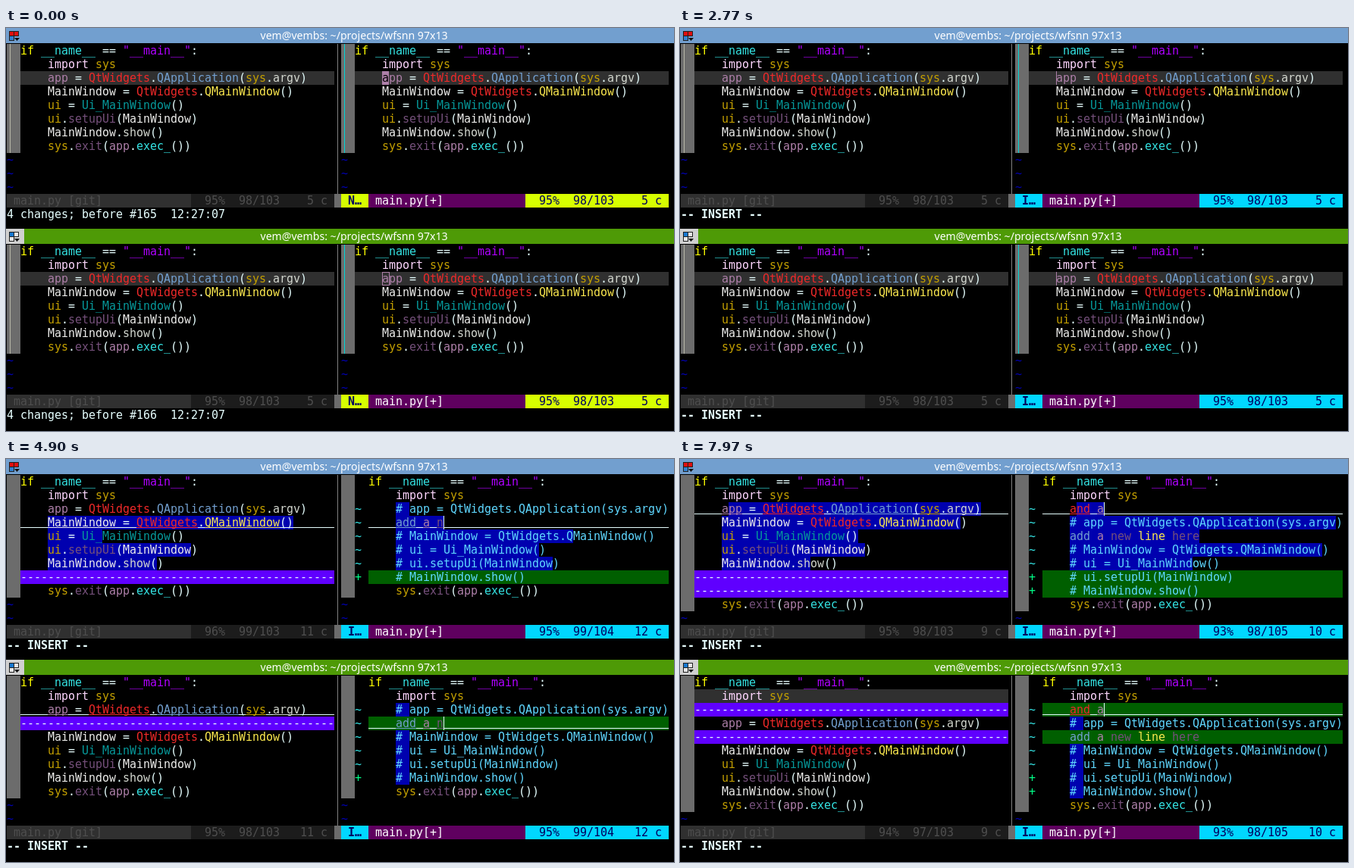
Animation, 881 px wide and 532 px high, one loop 8000 ms. Source, as an HTML page with a canvas:

```html
<!DOCTYPE html>
<html lang="en">
<head>
<meta charset="utf-8">
<title>Two diff views</title>
<style>
html, body { margin: 0; width: 100%; height: 100%; overflow: hidden; background: #000; }
canvas { display: block; }
</style>
</head>
<body>
<canvas id="stage" width="881" height="532"></canvas>
<script>
const ctx = document.getElementById('stage').getContext('2d');
const LOOP = 8000, CW = 9, CH = 18, X0 = 1;
const MONO = '15px "DejaVu Sans Mono", monospace';
const FG = '#e6ffff', GREY = '#6c6c6c', BLUE = '#0000af', GREEN = '#005f00', LINE_BG = '#303030';
const COMMENT = '#5fd7ff', FIRST = 96, TOTAL = 103;

const CODE = [
  'if __name__ == "__main__":',
  '    import sys',
  '    app = QtWidgets.QApplication(sys.argv)',
  '    MainWindow = QtWidgets.QMainWindow()',
  '    ui = Ui_MainWindow()',
  '    ui.setupUi(MainWindow)',
  '    MainWindow.show()',
  '    sys.exit(app.exec_())'
];
const WORDS = {
  if: '#ffff00', import: '#ffd7ff', __name__: '#34e2e2', sys: '#c4a000', app: '#ad7fa8',
  QtWidgets: '#ef2929', QApplication: '#729fcf', MainWindow: '#eeeeec', QMainWindow: '#fce94f',
  ui: '#c4a000', Ui_MainWindow: '#06989a', setupUi: '#75507b', show: '#d3d7cf', argv: '#d3d7cf',
  exit: '#75507b', exec_: '#34e2e2', add: '#729fcf', a: '#ad7fa8', n: '#75507b', new: '#75507b',
  line: '#fce94f', here: '#75507b', and: '#ef2929'
};
const SPARE = ['#729fcf', '#75507b', '#ad7fa8', '#c4a000'];
const MODES = {
  N: { bg: '#d7ff00', fg: '#00005f' },
  V: { bg: '#ffaf00', fg: '#000000' },
  I: { bg: '#00d7ff', fg: '#00005f' }
};

function box(x, y, w, h, color) {
  ctx.fillStyle = color;
  ctx.fillRect(x, y, w, h);
}

// One colour per character.
function colorize(text) {
  if (/^\s*#/.test(text)) return Array(text.length).fill(COMMENT);
  const out = [];
  for (const [part] of text.matchAll(/"[^"]*"|\w+|./g)) {
    let color = FG;
    if (part[0] === '"') color = '#af00ff';
    else if (/\w/.test(part)) color = WORDS[part] || SPARE[(part.charCodeAt(0) + part.length) % 4];
    for (let i = 0; i < part.length; i++) out.push(color);
  }
  return out;
}

// Range between the common start and the common end of two lines.
function changed(a, b) {
  let start = 0, end = 0;
  const n = Math.min(a.length, b.length);
  while (start < n && a[start] === b[start]) start++;
  while (end < n - start && a[a.length - 1 - end] === b[b.length - 1 - end]) end++;
  return [start, a.length - end];
}

const typed = (text, t, start, step) =>
  text.slice(0, Math.max(0, Math.floor((t - start) / step) + 1));

// Editor state at time t.
function editor(t) {
  const s = { mode: 'N', shape: 'block', line: 98, col: 5, lines: [], picked: 0,
    message: '', bold: false, signs: t >= 3300, lag: false };
  const lead = t >= 3250 ? '# ' : typed('# ', t, 2900, 150);
  s.lines = CODE.map((text, i) => {
    const touched = i > 1 && i < 7 && lead && (t >= 3250 || i === 2);
    return { text: touched ? '    ' + lead + text.slice(4) : text, touched, base: i };
  });
  const insert = () => { s.mode = 'I'; s.shape = 'bar'; s.message = '-- INSERT --'; s.bold = true; };
  const older = typed('add a new line here', t, 4150, 120);
  const newer = typed('and a', t, 7450, 120);

  if (t >= 3500) s.lines.splice(3, 0, { text: '    ' + older, fresh: t < 4200 });
  if (t >= 7100) s.lines.splice(2, 0, { text: '    ' + newer, fresh: t < 7400 });

  if (t < 900) s.message = 'undo';
  else if (t < 2350) {
    s.mode = 'V';
    s.picked = 1 + [1200, 1400, 1600, 2100].filter(k => k <= t).length;
    s.line = 97 + s.picked;
    s.message = '-- VISUAL BLOCK --';
    s.bold = true;
  } else if (t < 3250) {
    insert();
    s.col = 5 + lead.length;
  } else if (t >= 3500 && t < 7100) {
    s.line = t < 6800 ? 99 : 98;
    s.col = Math.min(5 + older.length, t < 6500 ? 24 : 23);
    if (t < 6500) insert();
    s.lag = t < 6440;
    if (t >= 6440) { s.shape = 'block'; s.message = ''; }
  } else if (t >= 7100) {
    insert();
    s.col = 5 + newer.length;
    s.lag = true;
  }
  s.leftCol = s.lag ? Math.max(5, s.col - 1) : s.col;
  s.leftLine = s.lag && s.col === 5 ? 98 : s.line;
  return s;
}

// Pairs left and right lines; the plain way puts all gaps after the block.
function align(s, plain) {
  const extra = s.lines.length - CODE.length;
  let block = 0;
  return s.lines.map((right, i) => {
    let left = right.base;
    if (plain && extra && i > 1 && i < s.lines.length - 1) left = block < 5 ? 2 + block++ : undefined;
    return { right, left, text: left === undefined ? null : CODE[left] };
  });
}

function terminal(top, s, focused) {
  const y = row => top + row * CH, x = col => X0 + col * CW;
  const fill = (row, col, n, color) => box(x(col), y(row), n * CW, CH, color);
  function write(row, col, text, color, bold) {
    ctx.font = (bold ? 'bold ' : '') + MONO;
    ctx.textAlign = 'left';
    [...text].forEach((ch, i) => {
      if (ch === ' ') return;
      ctx.fillStyle = Array.isArray(color) ? color[i] : color;
      ctx.fillText(ch, x(col + i), y(row) + 14);
    });
  }
  function codeLine(row, col, width, text, look) {
    const colors = colorize(text);
    if (look.bg) fill(row, col, width, look.bg);
    if (look.range) fill(row, col + look.range[0], Math.max(0, look.range[1] - look.range[0]), BLUE);
    write(row, col, text, colors);
    if (look.under) for (let i = 0; i < width; i++) {
      box(x(col + i), y(row) + 15, CW, 1, colors[i] && text[i] !== ' ' ? colors[i] : FG);
    }
  }

  const rows = align(s, focused);
  const diff = rows.some(r => r.text !== r.right.text);
  const textCol = s.signs ? 53 : 51, textWidth = 97 - textCol;
  const cursorRow = s.line - FIRST;
  let leftRow = s.leftLine - FIRST;
  while (rows[leftRow].text === null) leftRow--;

  let signCount = 0;
  rows.forEach(({ right, text }, row) => {
    const differs = text !== right.text;
    fill(row, 0, 2, GREY);
    fill(row, 49, 2, GREY);
    if (!diff) {
      box(5, y(row), 1, CH, '#b8b8a8');
      box(446, y(row), 1, CH, '#00d7d7');
    }
    if (text === null) {
      fill(row, 2, 46, '#5f00ff');
      write(row, 2, '-'.repeat(46), FG);
    } else {
      const here = row === leftRow;
      codeLine(row, 2, 46, text, {
        bg: here && !differs ? LINE_BG : null,
        range: differs ? changed(text, right.text) : null,
        under: here && differs
      });
    }
    const here = row === cursorRow && s.mode !== 'V';
    let range = differs && text !== null ? changed(right.text, text) : null;
    if (right.text.trim() === '') range = [0, 4];
    codeLine(row, textCol, textWidth, right.text, {
      bg: text === null ? GREEN : here && !differs ? LINE_BG : null,
      range, under: here && differs
    });
    if (s.signs && (right.touched || right.base === undefined) && !right.fresh) {
      const settled = !s.lines.some(l => l.fresh);
      const plus = settled && signCount >= 5;
      write(row, 51, plus ? '+' : '~', plus ? '#00ff87' : '#34e2e2');
      signCount++;
    }
  });
  for (let row = rows.length; row < 11; row++) {
    write(row, 0, '~', '#0000af');
    write(row, 49, '~', '#0000af');
  }
  box(437, top, 1, 11 * CH, '#808080');

  // Block selection and cursor.
  for (let i = 0; i < s.picked - 1; i++) {
    const text = rows[2 + i].right.text;
    fill(2 + i, textCol + 4, 1, GREY);
    write(2 + i, textCol + 4, text[4], colorize(text)[4]);
  }
  const line = rows[cursorRow].right.text, at = s.col - 1;
  const color = colorize(line)[at] || FG;
  if (s.shape === 'bar') box(x(textCol + at), y(cursorRow), 1, CH, color);
  else if (focused) {
    fill(cursorRow, textCol + at, 1, color);
    write(cursorRow, textCol + at, line[at] || ' ', '#000');
  } else {
    ctx.strokeStyle = color;
    ctx.lineWidth = 1;
    ctx.strokeRect(x(textCol + at) + .5, y(cursorRow) + .5, CW, CH - 1);
  }

  // Status lines.
  const place = (n, total, col) =>
    Math.floor(100 * n / total) + '%' + (n + '/' + total).padStart(8) + (col + ' c').padStart(7);
  const look = MODES[s.mode];
  fill(11, 0, 27, LINE_BG);
  fill(11, 27, 21, '#1c1c1c');
  fill(11, 48, 1, GREY);
  write(11, 1, 'main.py [git]', '#4e4e4e');
  write(11, 29, place(leftLineNumber(rows, leftRow), TOTAL, s.leftCol), '#4e4e4e');
  fill(11, 49, 4, look.bg);
  fill(11, 53, 23, '#5f005f');
  fill(11, 76, 21, look.bg);
  write(11, 50, s.mode + '…', look.fg, true);
  write(11, 54, 'main.py[+]', '#ffffff');
  write(11, 78, place(s.line, TOTAL + s.lines.length - CODE.length, s.col), look.fg);

  const message = s.message === 'undo'
    ? '4 changes; before #' + (focused ? 165 : 166) + '  12:27:07' : s.message;
  write(12, 0, message, FG, s.bold);
  if (s.picked) write(12, 86, s.picked + 'x1', FG);
}

const leftLineNumber = (rows, row) => FIRST + rows[row].left;

function titleBar(y, color, group, iconBg) {
  box(0, y, 881, 20, color);
  if (iconBg) box(0, y, 24, 20, iconBg);
  const tile = (dx, dy, fillColor) => {
    box(dx, y + dy, 7, 7, '#202020');
    box(dx + 1, y + dy + 1, 5, 5, fillColor);
  };
  tile(4, 4, group[0]);
  tile(10, 4, group[1]);
  tile(4, 10, group[2]);
  ctx.fillStyle = '#101010';
  ctx.beginPath();
  ctx.moveTo(11, y + 13);
  ctx.lineTo(18, y + 13);
  ctx.lineTo(14.5, y + 17);
  ctx.fill();
  ctx.font = '14.1px "Noto Sans", sans-serif';
  ctx.textAlign = 'center';
  ctx.fillStyle = '#ffffff';
  ctx.fillText('vem@vembs: ~/projects/wfsnn 97x13', 459, y + 15);
}

function draw(t) {
  box(0, 0, 881, 532, '#000');
  const s = editor(t);
  titleBar(0, '#729fcf', ['#e01010', '#e01010', '#3080d0']);
  terminal(21, s, true);
  titleBar(265, '#4e9a06', ['#1878d0', '#e8e8e8', '#e8e8e8'], '#d0d0d0');
  terminal(286, s, false);
}

const begin = performance.now();
function tick() {
  draw((performance.now() - begin) % LOOP);
  requestAnimationFrame(tick);
}
tick();
</script>
</body>
</html>
```
